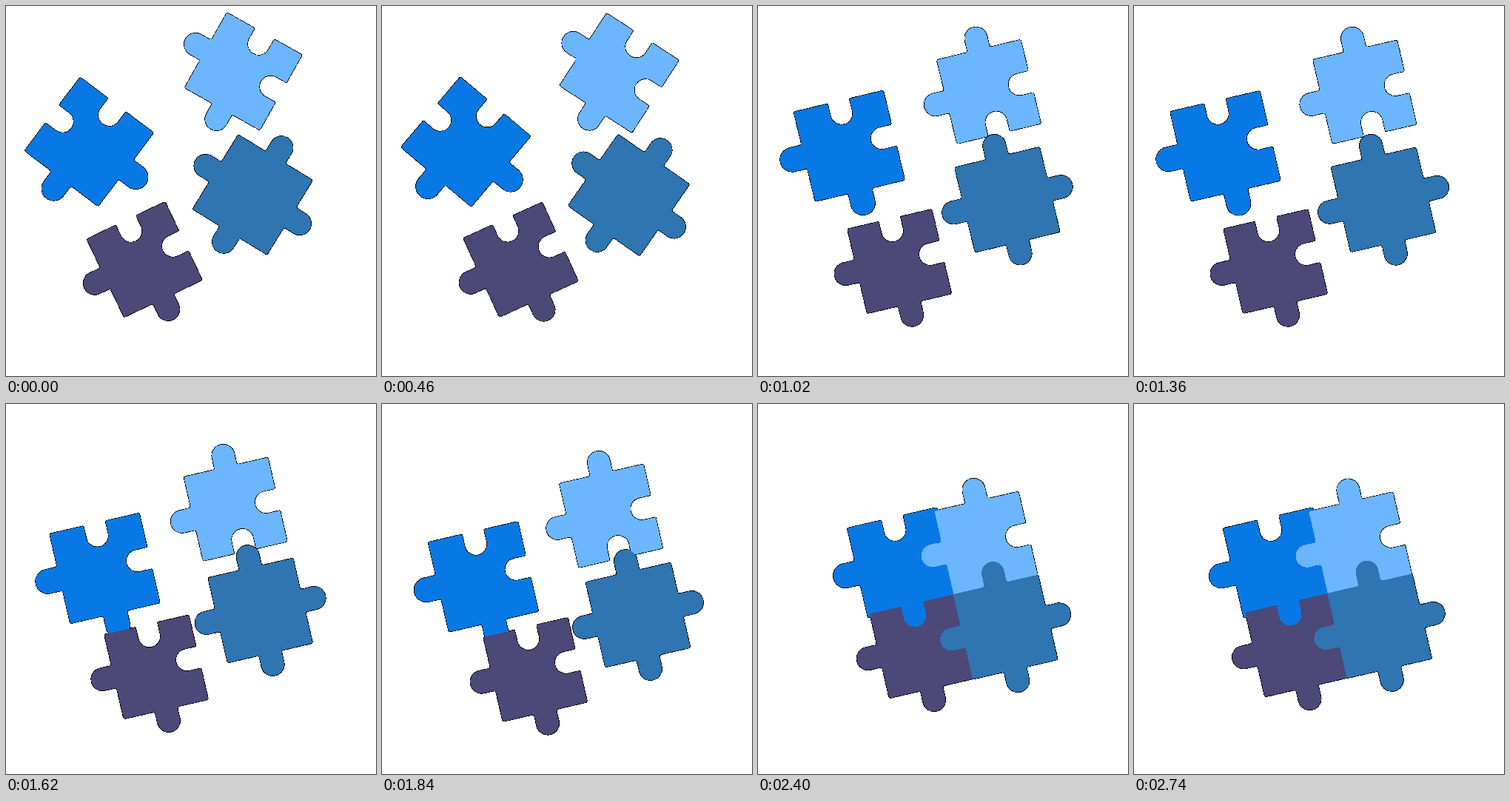
Recreate the animation shown at these times as an HTML page. Size 500 px wide and 500 px high, loop 6040 ms.

```html
<!DOCTYPE html>
<html lang="en">
<head>
<meta charset="utf-8">
<title>Puzzle</title>
<style>
  html, body { margin: 0; width: 100%; height: 100%; overflow: hidden; background: #fff; }
  svg { display: block; width: 100%; height: 100%; shape-rendering: crispEdges; }
  #edges { fill: #000; stroke: #000; stroke-width: 1.6; stroke-linejoin: round; }
</style>
</head>
<body>
<svg viewBox="0 0 500 500">
  <g id="edges"></g>
  <g id="faces"></g>
</svg>
<script>
const LOOP = 6040;
const TIMES = [0, 1340, 1840, 2310, 2740];
const END_ANGLE = -13;

// From back to front. col and row give the cell in the 2 by 2 grid;
// start, apart and near are pivot positions before the pieces join.
const pieces = [
  { color: '#0879e4', side: 124.3, col: -1, row: -1, angle: -52.9, knobs: ['bottom', 'left'],
    start: [115.6, 207.1], apart: [110.8, 209.6], near: [124.3, 253.7] },
  { color: '#4c4878', side: 117, col: -1, row: 1, angle: -25.5, knobs: ['bottom', 'left'],
    start: [179.7, 363.8], apart: [179.3, 364.2], near: [195.3, 378] },
  { color: '#6bb6ff', side: 116.5, col: 1, row: -1, angle: -60.6, knobs: ['top', 'left'],
    start: [299.2, 94.3], apart: [292.8, 104.3], near: [290.6, 139.3] },
  { color: '#2e75b1', side: 117.8, col: 1, row: 1, angle: -58.5, knobs: ['top', 'right', 'bottom', 'left'],
    start: [333.3, 255], apart: [337, 261.8], near: [346, 285] }
];

function rotate(x, y, deg) {
  const a = deg * Math.PI / 180, c = Math.cos(a), s = Math.sin(a);
  return [x * c - y * s, x * s + y * c];
}

// The pivot is the middle of the square and its knobs; this leads from it to the square's centre.
function squareOffset({ side, knobs }) {
  const reach = name => knobs.includes(name) ? side * 0.136 : 0;
  return [reach('left') - reach('right'), reach('top') - reach('bottom')];
}

// Pivot position in a joined grid around cx, cy.
function joined(piece, cx, cy, half) {
  const [dx, dy] = squareOffset(piece);
  const [x, y] = rotate(piece.col * half - dx, piece.row * half - dy, END_ANGLE);
  return [cx + x, cy + y];
}

function outline(piece) {
  const half = piece.side / 2, unit = piece.side / 117;
  const neck = 16 * unit, corner = 2.5;
  const [dx, dy] = squareOffset(piece);
  let d = '';
  ['top', 'right', 'bottom', 'left'].forEach((name, i) => {
    const knob = piece.knobs.includes(name);
    const out = knob ? 1 : -1;
    const r = knob ? 15.3 * unit : 15.3;
    const f = knob ? 3 : 1.5;
    const at = (u, v) => {
      const [x, y] = rotate(u, -half - v * out, i * 90);
      return `${(x + dx).toFixed(2)} ${(y + dy).toFixed(2)} `;
    };
    d += (i ? 'L' : 'M') + at(corner - half, 0)
      + 'L' + at(-r - f, 0) + 'Q' + at(-r, 0) + at(-r, f)
      + 'L' + at(-r, neck)
      + `A${r} ${r} 0 0 ${knob ? 1 : 0} ` + at(r, neck)
      + 'L' + at(r, f) + 'Q' + at(r, 0) + at(r + f, 0)
      + 'L' + at(half - corner, 0)
      + 'Q' + at(half, 0) + at(half, -corner * out);
  });
  return d + 'Z';
}

function addPath(layer, d, color) {
  const el = document.createElementNS('http://www.w3.org/2000/svg', 'path');
  el.setAttribute('d', d);
  if (color) el.setAttribute('fill', color);
  document.getElementById(layer).append(el);
  return el;
}

for (const p of pieces) {
  const d = outline(p);
  p.els = [addPath('edges', d), addPath('faces', d, p.color)];
  // The grid first joins loosely, then closes up.
  p.path = [p.start, p.apart, p.near, joined(p, 264.8, 257.8, 58), joined(p, 263.4, 257.2, 57)];
}

const mix = (a, b, k) => a + (b - a) * k;
const easeInOutQuint = x => x < 0.5 ? 16 * x ** 5 : 1 - 16 * (1 - x) ** 5;

function draw(ms) {
  const t = Math.min(ms, TIMES[TIMES.length - 1]);
  let i = 0;
  while (i < TIMES.length - 2 && t >= TIMES[i + 1]) i++;
  const k = easeInOutQuint((t - TIMES[i]) / (TIMES[i + 1] - TIMES[i]));
  for (const { path, angle, els } of pieces) {
    const [x, y] = path[i].map((v, n) => mix(v, path[i + 1][n], k));
    const turn = i ? END_ANGLE : mix(angle, END_ANGLE, k);
    for (const el of els) el.setAttribute('transform', `translate(${x} ${y}) rotate(${turn})`);
  }
}

const start = performance.now();
function tick() {
  draw((performance.now() - start) % LOOP);
  requestAnimationFrame(tick);
}
tick();
</script>
</body>
</html>
```
